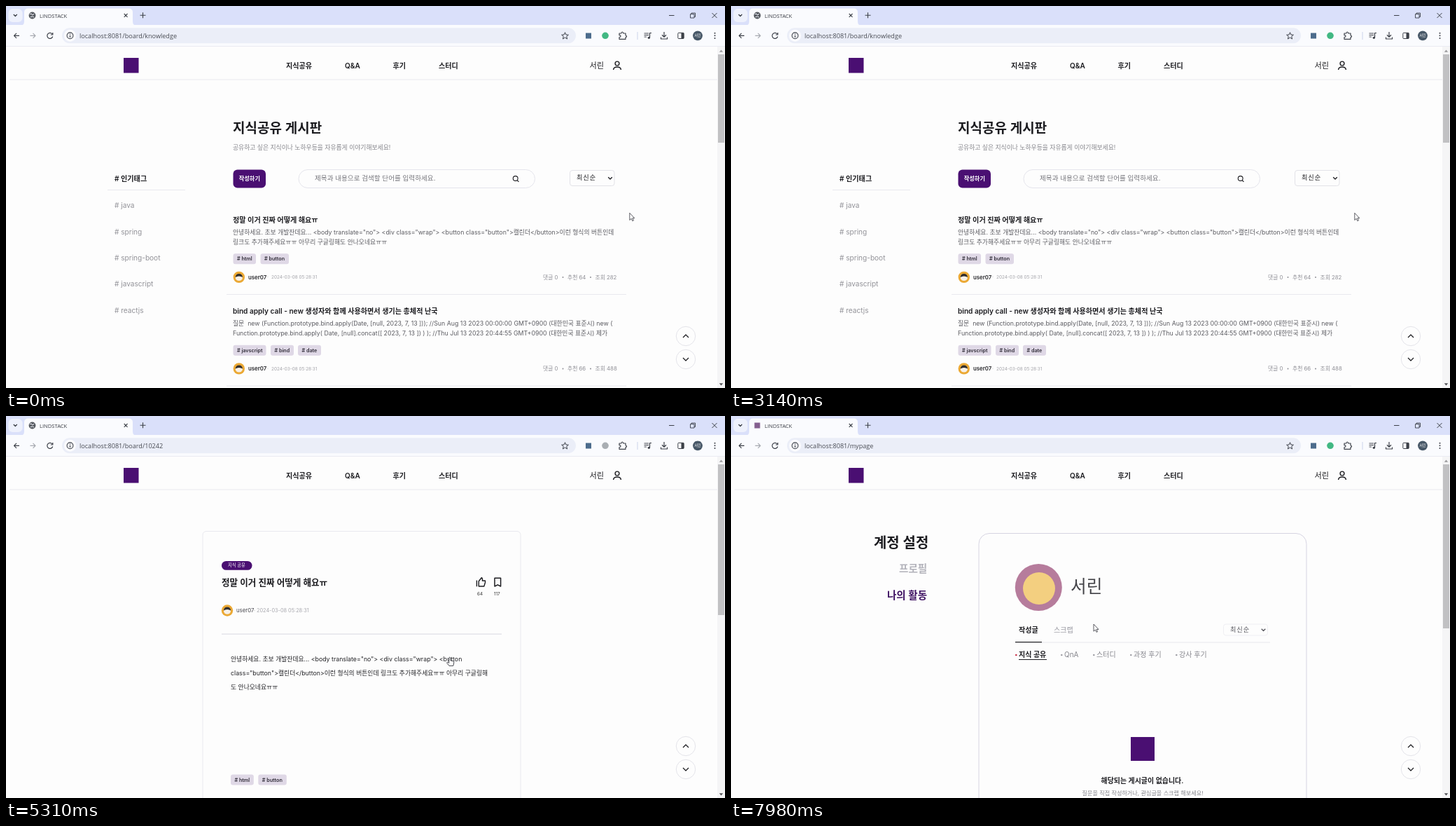
Animation of 1027x545 px, one loop 8000 ms. Source, as an HTML page:

```html
<!DOCTYPE html>
<html lang="ko">
<head>
<meta charset="utf-8">
<title>LINDSTACK</title>
<style>
html, body { margin: 0; width: 100%; height: 100%; overflow: hidden; background: #fdfdfd; }
svg { display: block; width: 100%; height: 100%; }
text { font-family: Inter, "Noto Sans CJK KR", "Noto Sans CJK", sans-serif; white-space: pre; }
text.ui { font-family: "Open Sans", "Noto Sans CJK KR", sans-serif; }
</style>
</head>
<body>
<svg id="stage" viewBox="0 0 1027 545"></svg>
<script>
const LOOP = 8000;
const SITE = 'LINDSTACK', PERSON = '서린', AUTHOR = 'user07';
const PURPLE = '#4a0f72', INK = '#1c1c20', PAGE = '#fdfdfd', EDGE = '#e9e9ef';
const stage = document.getElementById('stage');
let layer = stage;

function add(tag, attrs) {
  const el = document.createElementNS('http://www.w3.org/2000/svg', tag);
  for (const k in attrs) el.setAttribute(k, attrs[k]);
  layer.appendChild(el);
  return el;
}
function group(draw, parent = layer) {
  const outer = layer;
  layer = parent;
  const g = add('g', {});
  layer = g;
  draw();
  layer = outer;
  return g;
}
// y is the middle of the line of text
function text(x, y, size, str, fill = INK, weight = 400, more = {}) {
  const el = add('text', { x, y: y + size * 0.36, 'font-size': size, fill, 'font-weight': weight, ...more });
  el.textContent = str;
  return el;
}
const rect = (x, y, w, h, fill, rx = 0, stroke = 'none') =>
  add('rect', { x, y, width: w, height: h, fill, rx, stroke });
const circle = (cx, cy, r, fill, stroke = 'none') => add('circle', { cx, cy, r, fill, stroke });
const line = (d, stroke = INK, width = 1.2, fill = 'none') =>
  add('path', { d, stroke, 'stroke-width': width, fill, 'stroke-linejoin': 'round' });
const show = (el, on) => el.setAttribute('display', on ? 'inline' : 'none');
const move = (el, x, y) => el.setAttribute('transform', `translate(${x} ${y})`);

function tag(x, y, w, str) {
  rect(x, y - 7.5, w, 15, '#dfd8e6', 3);
  text(x + 5.5, y, 7.2, '# ' + str, '#302c38', 600);
}
function avatar(x, y) {
  circle(x, y, 8.2, '#eba935');
  add('ellipse', { cx: x, cy: y + 0.8, rx: 5, ry: 4.4, fill: '#f8f1e8' });
  line(`M${x - 5.2} ${y}Q${x - 4.5} ${y - 5} ${x} ${y - 5}Q${x + 4.5} ${y - 5} ${x + 5.2} ${y}Q${x} ${y - 3} ${x - 5.2} ${y}Z`, 'none', 0, '#33302f');
}
function picker(x, y, w, h, color, edge) {
  rect(x + 0.5, y + 0.5, w - 1, h - 1, PAGE, 3.5, edge);
  text(x + 10, y + h / 2 - 0.5, 9.2, '최신순', color, 400, { 'letter-spacing': 0.9 });
  const cx = x + w - 6.5, cy = y + h / 2;
  line(`M${cx - 2.8} ${cy - 1.3}L${cx} ${cy + 1.5}L${cx + 2.8} ${cy - 1.3}`, color, 1.3);
}
function post(y, p) {
  text(324, y, 10.1, p.title, INK, 600);
  p.body.forEach((s, i) => text(324, y + 17.7 + i * 14, 8.8, s, '#5c5c62'));
  p.tags.forEach(([x, w, s]) => tag(x, y + 55.7, w, s));
  avatar(332.8, y + 81.9);
  text(346, y + 81.7, 7.8, AUTHOR, '#26262a', 600);
  text(373, y + 81.7, 7, '·', '#999');
  text(379, y + 81.7, 6.4, '2024-03-08 05:28:31', '#a4a4aa');
  [[767, '댓글 0'], [802, '추천 ' + p.likes], [841.5, '조회 ' + p.views]]
    .forEach(([x, s]) => text(x, y + 81.7, 7.8, s, '#8f8f96'));
  [795.5, 835].forEach(x => circle(x, y + 82, 1, '#8f8f96'));
  rect(315, y + 106, 571, 1, EDGE);
}

let hoverRow;
const list = group(() => {
  text(324, 174.5, 19, '지식공유 게시판', INK, 600);
  text(324, 202, 8.8, '공유하고 싶은 지식이나 노하우등을 자유롭게 이야기해보세요!', '#85858b');
  text(155, 246.5, 10.1, '# 인기태그', INK, 600);
  rect(145, 262, 111, 1, EDGE);
  ['java', 'spring', 'spring-boot', 'javascript', 'reactjs']
    .forEach((s, i) => text(155, 284.5 + i * 37.4, 10.1, '# ' + s, '#929298'));
  rect(324.5, 233.5, 46.5, 26, PURPLE, 6);
  text(332.8, 246, 8.2, '작성하기', '#fff', 600);
  rect(418, 233.5, 337.5, 26, PAGE, 13, '#e5e5ec');
  text(441, 246, 9.6, '제목과 내용으로 검색할 단어를 입력하세요.', '#77777d');
  line('M730.2 248.6L732.4 250.8', INK, 1.2);
  add('circle', { cx: 727.7, cy: 246, r: 3.4, fill: 'none', stroke: INK, 'stroke-width': 1.1 });
  picker(805, 234, 64.5, 23, INK, '#e2e2e8');
  hoverRow = rect(314.5, 281, 572, 130.5, '#ecf6fa');
  post(305, {
    title: '정말 이거 진짜 어떻게 해요ㅠ',
    body: ['안녕하세요. 초보 개발잔데요... <body translate="no"> <div class="wrap"> <button class="button">캘린더</button>이런 형식의 버튼인데',
      '링크도 추가해주세요ㅠㅠ 아무리 구글링해도 안나오네요ㅠㅠ'],
    tags: [[324.5, 32.5, 'html'], [363.5, 40.5, 'button']], likes: 64, views: 282
  });
  post(435.5, {
    title: 'bind apply call - new 생성자와 함께 사용하면서 생기는 총체적 난국',
    body: ['질문  new (Function.prototype.bind.apply(Date, [null, 2023, 7, 13 ])); //Sun Aug 13 2023 00:00:00 GMT+0900 (대한민국 표준시) new (',
      'Function.prototype.bind.apply( Date, [null].concat([ 2023, 7, 13 ]) ) ); //Thu Jul 13 2023 20:44:55 GMT+0900 (대한민국 표준시) 제가'],
    tags: [[324.5, 47, 'javscript'], [378, 33, 'bind'], [417, 33, 'date']], likes: 66, views: 488
  });
});

let lower, bookmark;
const detail = group(() => {
  rect(281, 164.5, 454, 420, PAGE, 5, EDGE);
  rect(308, 207, 43.5, 12.8, PURPLE, 6.4);
  text(317, 213.2, 6.3, '지식 공유', '#fff', 500);
  text(308, 237.2, 12.55, '정말 이거 진짜 어떻게 해요ㅠ', INK, 600);
  line('M672.4 234.5V243.2M675.3 243V235.8L679.2 230.8Q681 231.2 680.4 235H684.5V237.5L682.8 243Z', INK, 1.4);
  bookmark = line('M698 231.2H706.6V243L702.3 240.8L698 243Z', INK, 1.5);
  text(673, 254, 6.3, '64', '#333');
  text(697, 254, 6.3, '117', '#333');
  lower = group(() => {
    avatar(316, 277.5);
    text(329, 277.5, 7.8, AUTHOR, '#46464c');
    text(354, 277.5, 7.6, '·', '#999');
    text(358, 277.7, 7.3, '2024-03-08 05:28:31', '#a8a8ae');
    rect(308, 310.5, 400, 1.2, '#dedee6');
    ['안녕하세요. 초보 개발잔데요... <body translate="no"> <div class="wrap"> <button',
      'class="button">캘린더</button>이런 형식의 버튼인데 링크도 추가해주세요ㅠㅠ 아무리 구글링해',
      '도 안나오네요ㅠㅠ'].forEach((s, i) => text(321, 347.3 + i * 20, 8.8, s, '#232327'));
    tag(321, 519, 32.8, 'html');
    tag(360.3, 519, 40.5, 'button');
  });
});

const mypage = group(() => {
  text(204, 181, 19.9, '계정 설정', INK, 600);
  text(240, 218, 14.6, '프로필', '#b4b4bc', 600);
  text(223, 256, 14.5, '나의 활동', '#3f1263', 600);
  rect(354, 167.5, 468, 420, PAGE, 15, '#d6d4e2');
  circle(439.3, 244.5, 33.5, '#b67c9c');
  circle(440, 246, 23, '#f3cf80');
  text(485, 243.5, 24.7, PERSON, '#444449', 400);
  text(411, 305.5, 10.1, '작성글', INK, 600);
  text(461, 305.5, 10.1, '스크랩', '#9a9aa2');
  rect(444, 322.5, 326, 1, '#e8e8ee');
  rect(406, 322, 38, 1.2, INK);
  picker(703, 296.5, 64, 17, '#55555c', '#efeff3');
  [[411, '지식 공유'], [476, 'QnA'], [522, '스터디'], [575, '과정 후기'], [640, '강사 후기']].forEach(([x, s], i) => {
    circle(x - 3.7, 341, 1.3, i ? '#a0a0a6' : '#c8324a');
    text(x, 340.5, 10, s, i ? '#85858c' : INK, i ? 400 : 600);
  });
  rect(411, 347, 40, 1, INK);
  rect(571, 458, 34, 34, PURPLE);
  text(528.5, 520, 9.95, '해당되는 게시글이 없습니다.', INK, 600);
  text(501.5, 538, 8.15, '질문을 직접 작성하거나, 관심글을 스크랩 해보세요!', '#85858c');
});

// Site header and scroll buttons
group(() => {
  rect(5, 104.5, 1011, 1, EDGE);
  rect(168, 74, 21.5, 21.5, PURPLE);
  [[400, '지식공유'], [484, 'Q&A'], [552.5, '후기'], [618, '스터디']]
    .forEach(([x, s]) => text(x, 85, 10.1, s, INK, 600));
  text(833.5, 84.7, 11.2, PERSON, INK, 500);
  add('circle', { cx: 873, cy: 82, r: 2.9, fill: 'none', stroke: INK, 'stroke-width': 1.4 });
  line('M867.6 91Q867.8 87 873 87Q878.2 87 878.4 91', INK, 1.5);
  [[471, -1], [504, 1]].forEach(([y, d]) => {
    circle(971, y, 13.7, PAGE, '#e4e4ea');
    line(`M967 ${y - 2 * d}L971 ${y + 2 * d}L975 ${y - 2 * d}`, INK, 1.2);
  });
});

const modal = group(() => {
  add('rect', { x: 0, y: 58, width: 1016, height: 487, 'fill-opacity': 0.4 });
  rect(357.3, 208, 220.7, 118.3, '#fdfdfd', 9);
  text(399, 252, 9.45, '마이페이지로 이동하시겠습니까?', '#2a2a2e');
  [[396, '#747479', '머무르기'], [473, '#000', '이동하기']].forEach(([x, c, s]) => {
    rect(x, 282, 67, 23.8, c);
    text(x + 17.2, 293.8, 8.2, s, '#fff', 400, { 'letter-spacing': 0.75 });
  });
});

// Browser window
let thumb, globe, siteIcon, devtool, url;
group(() => {
  const ICON = '#3c4048';
  rect(0, 0, 1027, 28, '#dae0fa');
  rect(3.5, 4, 20, 19, '#eef1fc', 6);
  line('M10.8 12L13.3 14.5L15.8 12', ICON, 1.3);
  line('M20 28Q26 28 26 22V9Q26 3.5 32 3.5H175Q181 3.5 181 9V22Q181 28 187 28Z', 'none', 0, '#fafbfe');
  globe = group(() => {
    circle(37.5, 13.5, 4.9, '#55595f');
    line('M34 12Q36 10 37 12T40 11M35 16Q37 14 40 16', '#e8ebf4', 1.1);
  });
  siteIcon = rect(33.5, 9.5, 8, 8, '#85608f');
  text(48, 14.3, 7.6, SITE, '#3a3d44', 400, { class: 'ui' });
  line('M168.7 11L173.5 15.8M173.5 11L168.7 15.8', ICON, 1.1);
  line('M191.5 13.3H199.5M195.5 9.3V17.3', ICON, 1.1);
  line('M947 13.5H954.5M1008.5 10L1015.5 17M1015.5 10L1008.5 17', ICON, 1);
  line('M977.5 11.5H983V17H977.5ZM979 11.5V10H984.5V15.5H983', ICON, 0.9);

  rect(0, 27, 1027, 31, '#fafbfe');
  rect(0, 57.2, 1027, 0.8, '#e6e8f0');
  line('M19 42.3H11.5M15 38.8L11.5 42.3L15 45.8', ICON, 1.2);
  line('M34.5 42.3H42M38.5 38.8L42 42.3L38.5 45.8', '#a6a9b0', 1.2);
  line('M66 40A4 4 0 1 0 66.7 43.5M66.8 38V41H63.8', ICON, 1.2);
  rect(80, 31.3, 734, 22, '#ebeef8', 11);
  circle(91.5, 42.3, 8.5, '#fcfcff');
  add('circle', { cx: 91.5, cy: 42.3, r: 4.4, fill: 'none', stroke: ICON, 'stroke-width': 1.1 });
  line('M91.5 41.7V45M91.5 39.6V40.7', ICON, 1.1);
  url = text(105, 42.6, 9.1, '', '#4a4d55', 400, { class: 'ui' });
  line('M798.5 37.7L799.9 41L803.4 41.2L800.7 43.5L801.6 47L798.5 45L795.4 47L796.3 43.5L793.6 41.2L797.1 41Z', ICON, 1);
  rect(828, 38.5, 8, 8, '#4c6c8c');
  devtool = circle(856, 42.3, 4.8, '#42b883');
  line('M876 39H879Q879 37 880.3 37T881.7 39H885V42Q886.5 42 886.5 43.3T885 44.7V47.3H876V44.5Q878 44.5 878 43T876 41.7Z', ICON, 1.2);
  rect(901.5, 37, 1, 11, '#ccd3ea');
  line('M911.5 39H918M911.5 41.5H918M911.5 44H915M919.5 45.5V38.5H922', ICON, 1.2);
  circle(918.3, 45.3, 1.6, ICON);
  line('M940 37V44M937 41.3L940 44.2L943 41.3M935.5 44.5V47H944.5V44.5', ICON, 1.2);
  rect(959.8, 38.3, 8.4, 8.2, 'none', 1, ICON);
  rect(964.5, 38.3, 3.7, 8.2, ICON);
  circle(988, 42.3, 6.9, '#465666');
  text(988, 42.3, 5.2, PERSON, '#fff', 400, { 'text-anchor': 'middle' });
  [38.7, 42.3, 45.9].forEach(y => circle(1012.5, y, 1, ICON));

  rect(1016, 58, 11, 487, '#f5f5f6');
  thumb = rect(1017, 69, 9, 126, '#c1c1c3');
  line('M1018.8 65.8L1021.5 62.6L1024.2 65.8Z', 'none', 0, '#9a9a9c');
  line('M1018.8 538.2L1021.5 541.4L1024.2 538.2Z', 'none', 0, '#505054');
});

const arrow = group(() => line('M0 0V10.2L2.4 8L4 11.4L5.6 10.7L4.1 7.4H7Z', '#33343c', 0.8, '#fff'));
const hand = group(() =>
  line('M-1.1 1Q0 -.8 1.1 1V4.8L4.8 5.7Q6.3 6.2 6 8L5 12.4H-.8L-4 8.4Q-4 6.8 -2.6 7.2L-1.1 8.6Z', '#33343c', 0.9, '#fff'));

const OPEN = 4850, READY = 5700, SAVED = 6900, LEAVE = 7750;
// [time, x, y] of the pointer
const PATH = [[0, 890.8, 295.3], [3600, 890.8, 295.3], [4060, 838, 312.3], [4120, 838, 312.3], [4560, 633.8, 344],
  [5900, 633.8, 344], [6550, 705, 235.8], [6980, 705, 235.8], [7380, 518, 297], [LOOP, 518, 297]];

function pointer(t) {
  const i = PATH.findIndex(p => p[0] > t);
  const [t0, x0, y0] = PATH[i - 1], [t1, x1, y1] = PATH[i];
  const u = (t - t0) / (t1 - t0), e = u * u * (3 - 2 * u);
  return [x0 + (x1 - x0) * e, y0 + (y1 - y0) * e];
}

function draw(t) {
  const [x, y] = pointer(t);
  const onList = t < OPEN, onMy = t >= LEAVE, saved = t >= SAVED;
  const hover = onList && x < 886;
  show(list, onList);
  show(detail, !onList && !onMy);
  show(mypage, onMy);
  show(modal, saved && !onMy);
  show(hoverRow, hover);
  show(globe, !onMy);
  show(siteIcon, onMy);
  bookmark.setAttribute('fill', saved ? INK : 'none');
  move(lower, 0, saved ? 9.3 : 0);
  devtool.setAttribute('fill', t >= OPEN && t < READY ? '#a9aeb3' : '#42b883');
  url.textContent = 'localhost:8081/' + (onList ? 'board/knowledge' : onMy ? 'mypage' : 'board/10242');
  thumb.setAttribute('height', onList ? 126 : onMy ? 234 : saved ? 212 : 215);

  const pointing = hover || (t >= OPEN && t < 5930) || (t > 6400 && t < 7000);
  show(hand, pointing);
  show(arrow, !pointing);
  move(pointing ? hand : arrow, x, y);
}

function tick() {
  draw(performance.now() % LOOP);
  requestAnimationFrame(tick);
}
tick();
</script>
</body>
</html>
```
